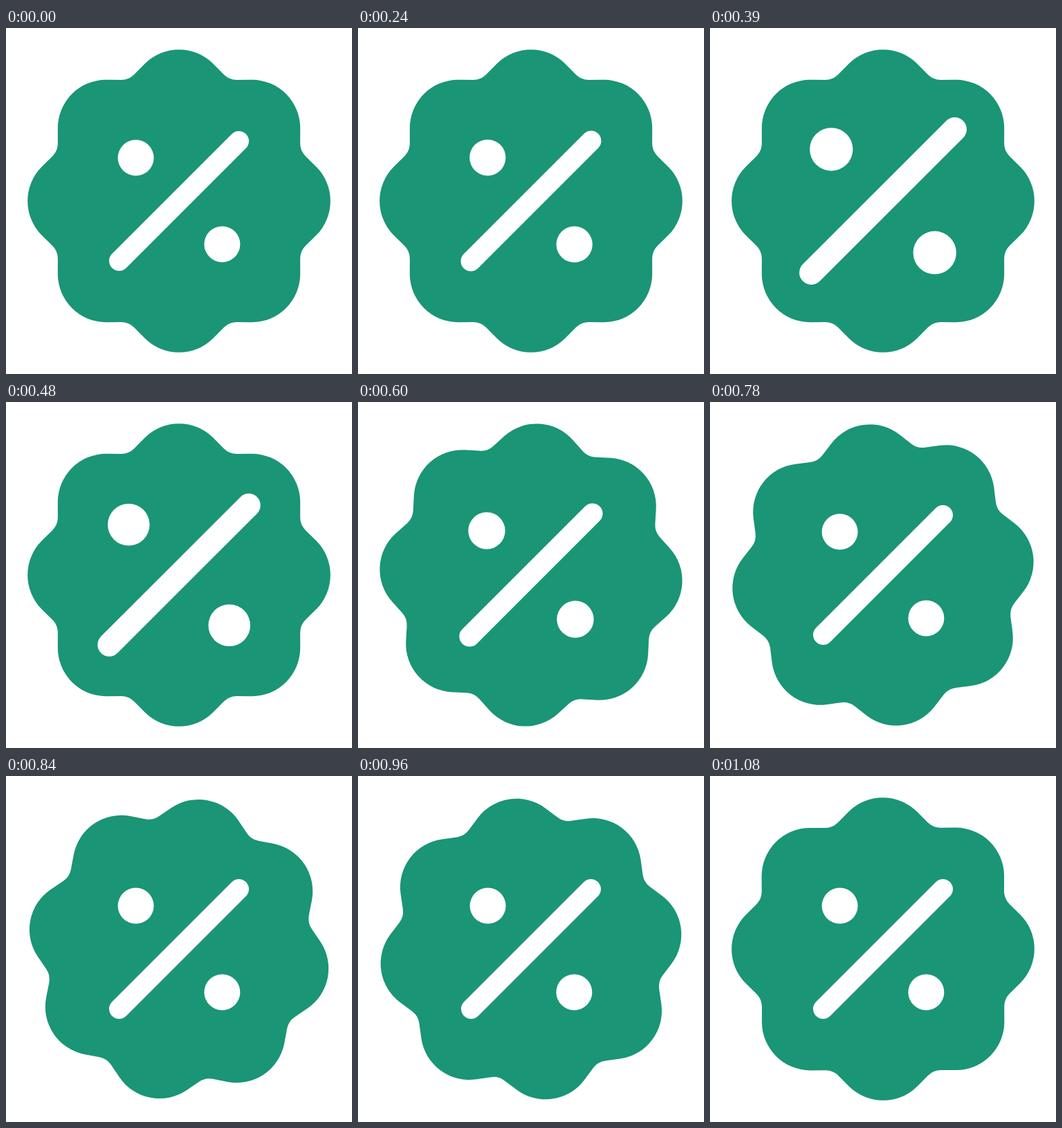
Write an HTML page with a canvas that moves like this. It is 500 px wide and 500 px high and loops after 1.8 s.

```html
<!DOCTYPE html>
<html>
<head>
<meta charset="utf-8">
<title>Discount badge</title>
<style>
  html, body { margin: 0; width: 100%; height: 100%; overflow: hidden; background: #fff; }
  canvas { display: block; }
</style>
</head>
<body>
<canvas id="stage" width="500" height="500"></canvas>
<script>
const ctx = document.getElementById('stage').getContext('2d');
const LOOP = 1800, STEP = 30, GREEN = '#1a9575';
const { PI, sin, cos } = Math;

// Ease in and out along a symmetric cubic Bezier with handle length h.
function ease(x, h) {
  if (x <= 0) return 0;
  if (x >= 1) return 1;
  let lo = 0, hi = 1, u;
  for (let i = 0; i < 30; i++) {
    u = (lo + hi) / 2;
    const at = 3 * h * u * (1 - u) ** 2 + 3 * (1 - h) * u * u * (1 - u) + u ** 3;
    if (at < x) lo = u; else hi = u;
  }
  return u * u * (3 - 2 * u);
}

const progress = (t, from, to, h = 0.42) => ease((t - from) / (to - from), h);

// Eight convex lobes joined by concave arcs and short tangents.
function badge() {
  ctx.beginPath();
  for (let k = 0; k < 8; k++) {
    const a = k * PI / 4, b = a + PI / 8;
    ctx.arc(148.8 * cos(a), 148.8 * sin(a), 70, a - PI / 4, a + PI / 4);
    ctx.arc(218 * cos(b), 218 * sin(b), 26.3, a + PI * 5 / 4, a + PI, true);
  }
  ctx.closePath();
  ctx.fillStyle = GREEN;
  ctx.fill();
}

function percent() {
  ctx.strokeStyle = ctx.fillStyle = '#fff';
  ctx.lineWidth = 29;
  ctx.lineCap = 'round';
  ctx.beginPath();
  ctx.moveTo(-86.5, 86.5);
  ctx.lineTo(86.5, -86.5);
  ctx.stroke();
  for (const p of [-62.4, 62.4]) {
    ctx.beginPath();
    ctx.arc(p, p, 26, 0, 2 * PI);
    ctx.fill();
  }
}

function draw(now) {
  const t = Math.floor(now % LOOP / STEP) * STEP;
  const turn = PI / 2 * progress(t, 512, 1096, 0.5);
  const scale = 1 + 0.2 * (progress(t, 220, 405) - progress(t, 405, 665));

  ctx.setTransform(1, 0, 0, 1, 0, 0);
  ctx.clearRect(0, 0, 500, 500);
  ctx.translate(250, 250);
  ctx.save();
  ctx.rotate(turn);
  badge();
  ctx.restore();
  ctx.scale(scale, scale);
  percent();
}

const start = performance.now();
function tick() {
  draw(performance.now() - start);
  requestAnimationFrame(tick);
}
tick();
</script>
</body>
</html>
```
